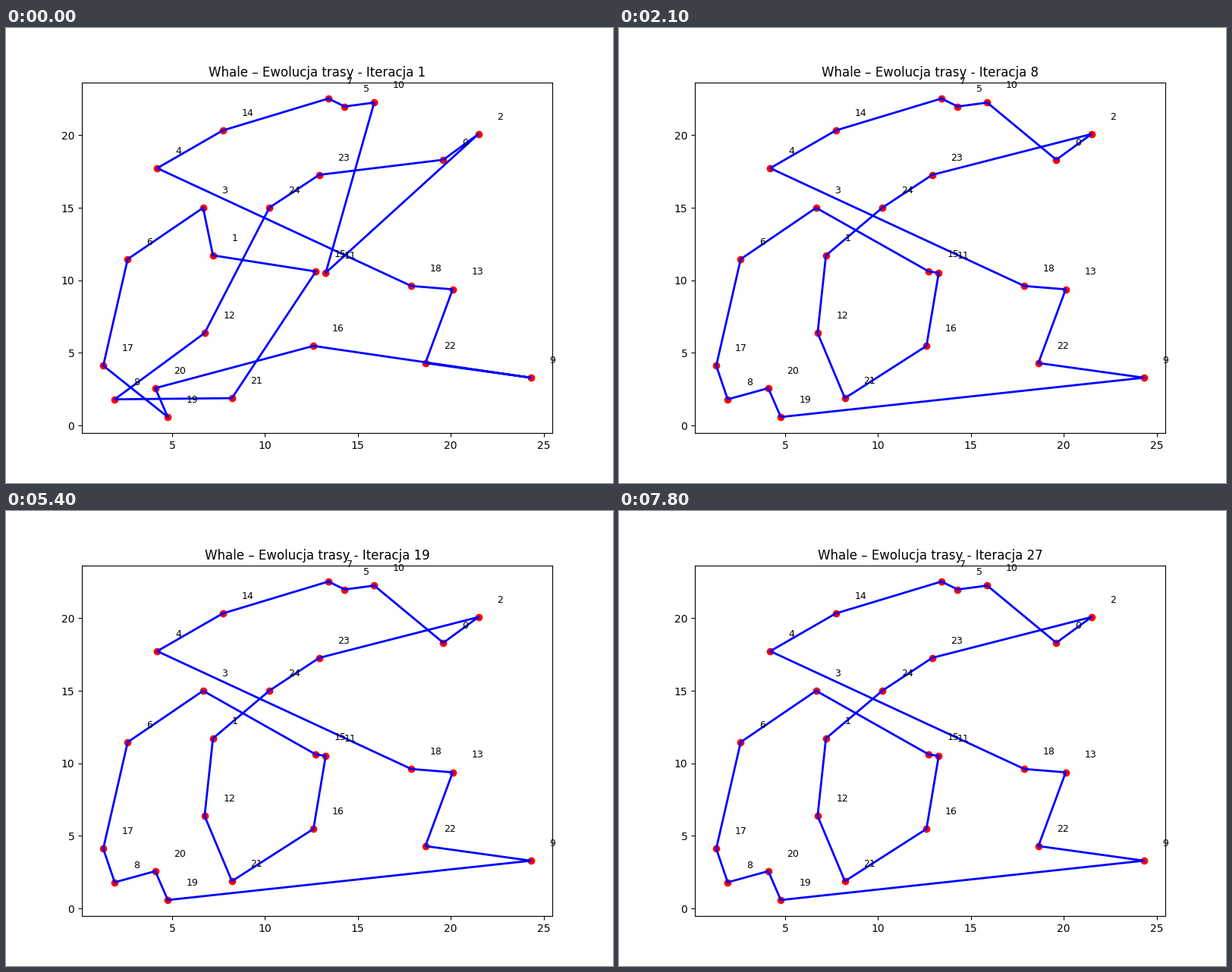
Recreate the animation shown at these times as a matplotlib script. Size 800 by 600 pixels, loop 8 s.

```python
import matplotlib.pyplot as plt
from matplotlib.animation import FuncAnimation

INTERVAL = 100             # ms per animation tick
LOOP = 8000                # ms
ITERATION_TIME = 300       # ms each iteration stays on screen
REPAIRS_PER_ITERATION = 2

# City positions, listed in the order of the final tour.
CITIES = {
    7: (13.415, 22.53), 14: (7.73, 20.33), 4: (4.20, 17.73), 18: (17.88, 9.61),
    13: (20.105, 9.38), 22: (18.635, 4.30), 9: (24.315, 3.29), 19: (4.77, 0.58),
    20: (4.095, 2.57), 8: (1.91, 1.80), 17: (1.295, 4.12), 6: (2.61, 11.46),
    3: (6.67, 15.00), 15: (12.74, 10.61), 11: (13.27, 10.52), 16: (12.61, 5.48),
    21: (8.22, 1.88), 12: (6.75, 6.37), 1: (7.20, 11.72), 24: (10.24, 15.01),
    23: (12.92, 17.27), 2: (21.49, 20.08), 0: (19.60, 18.31), 10: (15.88, 22.25),
    5: (14.29, 21.98),
}

# Misplaced cities of the starting tour: (city, its wrong predecessor).
MISPLACED = [(16, 9), (20, 16), (8, 21), (1, 3), (0, 23), (11, 2)]


def tour_at(iteration):
    """Final tour with the not yet repaired cities still out of place."""
    tour = list(CITIES)
    repaired = REPAIRS_PER_ITERATION * (iteration - 1)
    for city, predecessor in MISPLACED[:max(0, len(MISPLACED) - repaired)]:
        tour.remove(city)
        tour.insert(tour.index(predecessor) + 1, city)
    return tour


def closed_path(tour):
    return zip(*(CITIES[city] for city in tour + tour[:1]))


fig, ax = plt.subplots(figsize=(8, 6), dpi=100)
ax.scatter(*zip(*CITIES.values()), c="red")
route, = ax.plot(*map(list, closed_path(tour_at(1))), "b-", linewidth=2)
for number, (x, y) in CITIES.items():
    ax.text(x + 1, y + 1, str(number), fontsize=9)
title = ax.set_title("")


def update(tick):
    iteration = tick * INTERVAL // ITERATION_TIME + 1
    route.set_data(*map(list, closed_path(tour_at(iteration))))
    title.set_text(f"Whale – Ewolucja trasy - Iteracja {iteration}")
    return route, title


anim = FuncAnimation(fig, update, frames=LOOP // INTERVAL, interval=INTERVAL,
                     repeat=True, repeat_delay=0)
plt.show()
```
